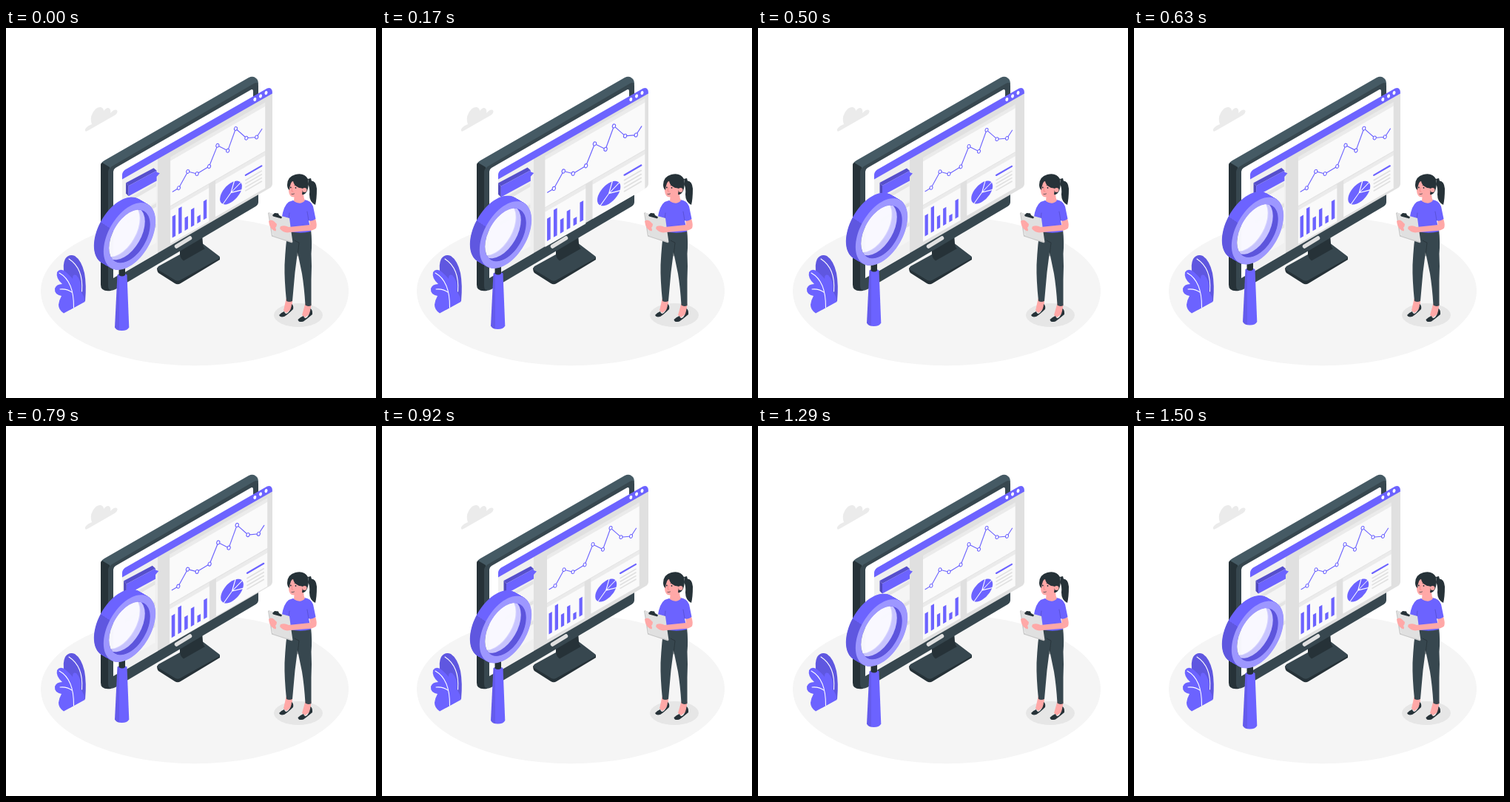
Animation, 500 px wide and 500 px high, one loop 1540 ms. Source, as an HTML page:

```html
<!DOCTYPE html>
<html lang="en">
<head>
<meta charset="utf-8">
<title>Data analysis</title>
<style>
  html, body { margin: 0; width: 100%; height: 100%; overflow: hidden; background: #fff; }
  svg { display: block; width: 100vw; height: 100vh; }
  .main { fill: #6c63ff; }
  .dark { fill: #263238; }
  .slate { fill: #37474f; }
  .skin { fill: #ffa8a7; }
  .line { fill: none; stroke-linecap: round; stroke-linejoin: round; }
</style>
</head>
<body>
<svg viewBox="0 0 500 500">
  <defs>
    <linearGradient id="side" gradientUnits="userSpaceOnUse" x1="130" y1="262" x2="128" y2="265">
      <stop offset=".5" stop-color="#6c63ff"/><stop offset=".5" stop-color="#5f57e0"/>
    </linearGradient>
    <linearGradient id="grip">
      <stop offset=".3" stop-color="#645bec"/><stop offset=".3" stop-color="#6c63ff"/>
    </linearGradient>
    <clipPath id="hole"><circle r="32" transform="matrix(.866 -.5 0 1 167 282)"/></clipPath>
  </defs>

  <ellipse cx="255" cy="355.500" rx="208" ry="100.800" fill="#f5f5f5"/>
  <path fill="#ebebeb" d="M107 139Q106 134 116 130Q113 122 117 115Q122 106 128 107Q132 108 132 112Q137 106 140 109Q142 111 141 115Q148 108 150.500 112Q151 116 145 119L111 138.500Q108 140.500 107 139Z"/>

  <g id="plant">
    <path fill="#5f57e0" d="M79 333Q76 320 80 312Q85 305 93 308Q102 314 106 331Q109 347 107 369L86 381Z"/>
    <path class="main" d="M78 385.500Q71 381 71 374Q72 367 75 362Q65 360 66 352Q68 346 76 346Q67 338 69 330Q73 324 80 329Q87 335 90 339Q90 332 95 334Q103 342 101 356Q106 362 106.500 370Z"/>
    <path class="line" stroke="#fff" stroke-width="1.100" d="M85 312Q105 325 102.500 356M72 331Q92 342 91.500 378M73 353Q82 352 89 357"/>
  </g>

  <g id="monitor">
    <path class="dark" d="M204 324L232 340L289 309V313L236 345Q232 347.500 228 345L206 331Q204 329 204 324Z"/>
    <path class="slate" d="M206 322L264 290L287 307.500Q291 310 287 312L235 341Q232 342.500 229 341L206 327Q203 325 206 322Z"/>
    <path class="dark" d="M235 297L265 279L266 291Q266 296 269 298L240 314.500Q236 312 235 306Z"/>
    <path fill="#455a64" d="M128 185Q129 181 133 179L328 67Q334 64 338 68Q341 70 341 76L139 193Z"/>
    <path class="dark" d="M128 185Q128 183 130 182L140 188L142 355Q128 357 128 347Z"/>
    <path class="slate" d="M138 195Q138 190 143 187L335 75Q341 72 341 78V235Q341 238.500 337.500 241L148 353Q138 358 138 348Z"/>
    <path fill="#fff" d="M145 194Q145 191 148 189L330 84Q334 81 334 86V228L145 338Z"/>
    <path class="line" stroke="#e0e0e0" stroke-width="5.500" d="M230.500 295L248.500 284"/>
  </g>

  <path fill="#e0e0e0" d="M157 200L360 84V210Q360 214 356 216.500L157 332Z"/>
  <path fill="#f0f0f0" d="M157 200L205 173V304L157 332Z"/>

  <g id="content">
    <g id="tiles"></g>
    <path fill="#564fcc" d="M164.500 209L201 189.500L205 193L168 213Z"/>
    <path fill="#4f48bd" d="M164.500 209L168 213V226.500L164.500 223Z"/>
    <path class="main" d="M168 213L205 193V195L209 196.500L205 201V206.500L168 226.500Z"/>
    <g id="chart"></g>
    <g id="bars"></g>
    <g transform="matrix(14.500 -8.400 0 13 302.700 222)">
      <circle class="main" r="1"/>
      <path class="line" stroke="#fff" stroke-width=".09" d="M.3-.98L0 0L.95 .35M.88-.45L0 0L-.75 .7"/>
    </g>
    <g id="notes"></g>
  </g>

  <path class="main" d="M157 204.500V199Q157 194 161 191.500L353 81.500Q360 79 360 88.500Z"/>
  <g fill="#fff">
    <ellipse cx="336.300" cy="96.500" rx="1.900" ry="2.600" transform="rotate(20 336.300 96.500)"/>
    <ellipse cx="344" cy="92" rx="1.900" ry="2.600" transform="rotate(20 344 92)"/>
    <ellipse cx="351.500" cy="87.700" rx="1.900" ry="2.600" transform="rotate(20 351.500 87.700)"/>
  </g>

  <g id="lens">
    <path fill="url(#grip)" d="M150.500 334Q157 330 163.500 334L166.300 405Q164 409.500 156.500 409.500Q149 409.500 147 405Z"/>
    <path class="dark" d="M152.500 322H161V334.500Q157 337.500 152.500 334.500Z"/>
    <g id="rim" fill="url(#side)"></g>
    <path fill="#9d97ff" fill-rule="evenodd" id="face"/>
    <g clip-path="url(#hole)">
      <path fill="#5d55dc" fill-rule="evenodd" id="inner"/>
      <circle r="32" fill="#d3d0ff" transform="matrix(.866 -.5 0 1 160 278)" opacity=".9"/>
      <circle r="32" fill="#fff" transform="matrix(.866 -.5 0 1 153 274)" opacity=".85"/>
    </g>
  </g>

  <g id="woman">
    <ellipse cx="395" cy="388" rx="33" ry="16" fill="#e6e6e6"/>
    <path class="skin" d="M378.500 366H387L386.500 379L379 385L375 382ZM404.500 372H412.500L411 386L404 391L400 388Z"/>
    <path class="dark" d="M386 373Q389 375 388 380Q381 387 376 390Q370 391.500 369 388Q371 385 376 383Q377 388 381 385Q386 380 386 373ZM411.500 379Q414.500 381 414 387Q407 393 402 396.500Q395 398.500 394.500 394Q397 391 402 389Q403 394 407 391Q411 386 411.500 379Z"/>
    <path class="slate" d="M381 273L412 272Q414 290 412.500 305Q413.500 322 412.500 340L412.500 375Q408 377 404.500 374.500Q403 350 400 332L394 303L390.500 330L387 369Q383 371 379 369Q376 340 376.500 320Q378 290 381 273Z"/>
    <path class="line" stroke="#263238" stroke-width=".8" d="M390 287Q393 289 396 290L394 308"/>
    <path class="dark" d="M409 207Q419 204 420 217Q420 231 418 239Q410 235 410 225Q411 216 408 211Z"/>
    <path class="skin" d="M410 256L417.500 256Q421 266 419 270.500Q416 273 411 272Z"/>
    <path class="main" d="M388 233Q394 237 403 232Q412 233 415 241L418.500 258Q413 262 409 260L412 275Q396 279 380 274L381 259L372.500 257Q375 240 382 235Z"/>
    <path class="skin" d="M390 222L402 221Q402 230 404 233Q398 240 389 234Z"/>
    <path class="line" stroke="#554dce" stroke-width=".8" d="M409 260L407 248M382 259L383 250"/>
    <path class="skin" d="M383 207Q381 216 382.500 223Q384 229 390 228.500Q400 228 405 220L404 207Z"/>
    <path class="dark" d="M380 212Q380 201 391 198Q403 195 408 204Q410 212 407 220Q404 226 400 225L401 217Q398 216 396 216Q389 213 388 207Q386 207 385 210Q383 215 383 219Q380 217 380 212Z"/>
    <circle class="skin" cx="403.500" cy="219" r="3"/>
    <circle class="dark" cx="384.800" cy="215.500" r=".9"/>
    <circle class="dark" cx="391.500" cy="216" r=".9"/>
    <path class="line" stroke="#263238" stroke-width=".7" d="M390 212.500L393 213M386 224.500Q388 225 389.500 224"/>
    <path class="line" stroke="#f28080" stroke-width=".7" d="M387 216L386 220.500L388 221"/>
    <path class="dark" d="M408 204L412 203L413 207L409 208Z"/>
    <path fill="#c7c7c7" d="M354 250L356 249L360 280L387 289L386.500 290.500L359 281.500Z"/>
    <path fill="#e0e0e0" d="M356 249.500L383 257Q385 273 387.500 289.500L361 281Q358 265 355 251Z"/>
    <path class="dark" d="M360 253L363 250L368 250.500L369 253L373 255.500L372 257.500L361 254.500Z"/>
    <path class="skin" d="M355 261Q358 258 362 261L366 265Q366 268 364 270Q366 273 364 274.500Q356 272 355 261Z"/>
    <path class="skin" d="M371 268Q377 266 382 269L411 266Q417 265 419 270Q416 274 408 274L384 276Q375 278 370 271Z"/>
  </g>
</svg>
<script>
  const $ = id => document.getElementById(id);
  const SLOPE = 0.577;

  // Slab on the wall plane with a shaded top edge
  const slab = (x, y, w, h, face = '#fafafa', edge = '#ebebeb') => {
    const rect = (y0, tall, fill) => `<rect y="${y0}" width="${w}" height="${tall}" fill="${fill}"/>`;
    return `<g transform="matrix(1 ${-SLOPE} 0 1 ${x} ${y})">${rect(-5, 5, edge)}${rect(0, h, face)}</g>`;
  };
  $('tiles').innerHTML =
    slab(223, 180.2, 124.7, 59) + slab(223, 245, 50.7, 44) + slab(282.3, 210.8, 65.4, 43) +
    [236, 263, 290].map(y => slab(166, y, 38.5, 20, '#f5f5f5', '#e4e4e4')).join('');

  const points = [[226, 220.7], [234, 215.9], [246, 194.2], [258, 197.2], [274, 187.5], [285, 160],
    [298.5, 166.8], [309, 137.8], [323, 150.2], [336.5, 149], [343.5, 138.2]];
  $('chart').innerHTML =
    `<polyline class="line" stroke="#6c63ff" stroke-width="1.1" points="${points.join(' ')}"/>` +
    points.slice(1, -1).map(([x, y]) =>
      `<ellipse cx="${x}" cy="${y}" rx="1.9" ry="2.4" transform="rotate(20 ${x} ${y})" fill="#fff" stroke="#6c63ff"/>`).join('');

  $('bars').innerHTML = [28, 34, 17, 23, 9, 24.5].map((h, i) => {
    const x = 225.5 + i * 8.2, y = 281.5 - i * 8.2 * SLOPE;
    return `<path class="main" d="M${x} ${y}v${-h}l4.300 -2.500v${h}z"/>`;
  }).join('');

  $('notes').innerHTML = [0, 1, 2, 3, 4].map(i => {
    const y = 199 + i * 4.6 + (i ? 2 : 0);
    return `<path class="line" stroke="${i ? '#e0e0e0' : '#6c63ff'}" stroke-width="${i ? 1.6 : 2.1}" d="M322 ${y}L343 ${y - 12.2}"/>`;
  }).join('');

  // Closed outline of a circle lying on the wall plane
  const ring = (x, y, r) => {
    const pts = Array.from({ length: 72 }, (_, i) => {
      const a = i * Math.PI / 36, c = Math.cos(a) * r;
      return `${(x + c * 0.866).toFixed(2)} ${(y - c / 2 + Math.sin(a) * r).toFixed(2)}`;
    });
    return `M${pts.join('L')}Z`;
  };
  const LX = 167, LY = 282, R = 40.6, HOLE = 32, DEPTH = 13;
  const hollow = (x, y) => ring(x, y, R) + ring(x, y, HOLE);
  $('rim').innerHTML = Array.from({ length: DEPTH * 2 }, (_, i) => {
    const d = DEPTH - i / 2;
    return `<path fill-rule="evenodd" d="${hollow(LX - d, LY - d * SLOPE)}"/>`;
  }).join('');
  $('face').setAttribute('d', hollow(LX, LY));
  $('inner').setAttribute('d', ring(LX, LY, HOLE) + ring(LX - 7, LY - 4, HOLE));

  const STEP = 1000 / 24, LOOP = 1540, COUNT = 37;
  const beat = [[0, 1], [0.1, 1.1], [0.3, 1], [0.4, 1], [0.5, 1.1], [0.6, 1], [1, 1]];
  const float = [[0, 0], [0.5, -9.2], [1, 0]];

  const sample = (keys, p) => {
    const i = Math.max(1, keys.findIndex(k => k[0] >= p));
    const [a, u] = keys[i - 1], [b, v] = keys[i];
    return u + (v - u) * (p - a) / (b - a);
  };

  const draw = now => {
    // 24 pictures a second, with start times rounded to 10 ms
    const n = Math.min(COUNT - 1, Math.floor((now % LOOP + 4) / STEP));
    const p = (n + 1) / COUNT;
    $('content').setAttribute('transform',
      `translate(255 203) scale(${sample(beat, p)}) translate(-255 -203)`);
    $('lens').setAttribute('transform', `translate(0 ${sample(float, p)})`);
  };

  const start = performance.now();
  const tick = () => {
    draw(performance.now() - start);
    requestAnimationFrame(tick);
  };
  tick();
</script>
</body>
</html>
```
